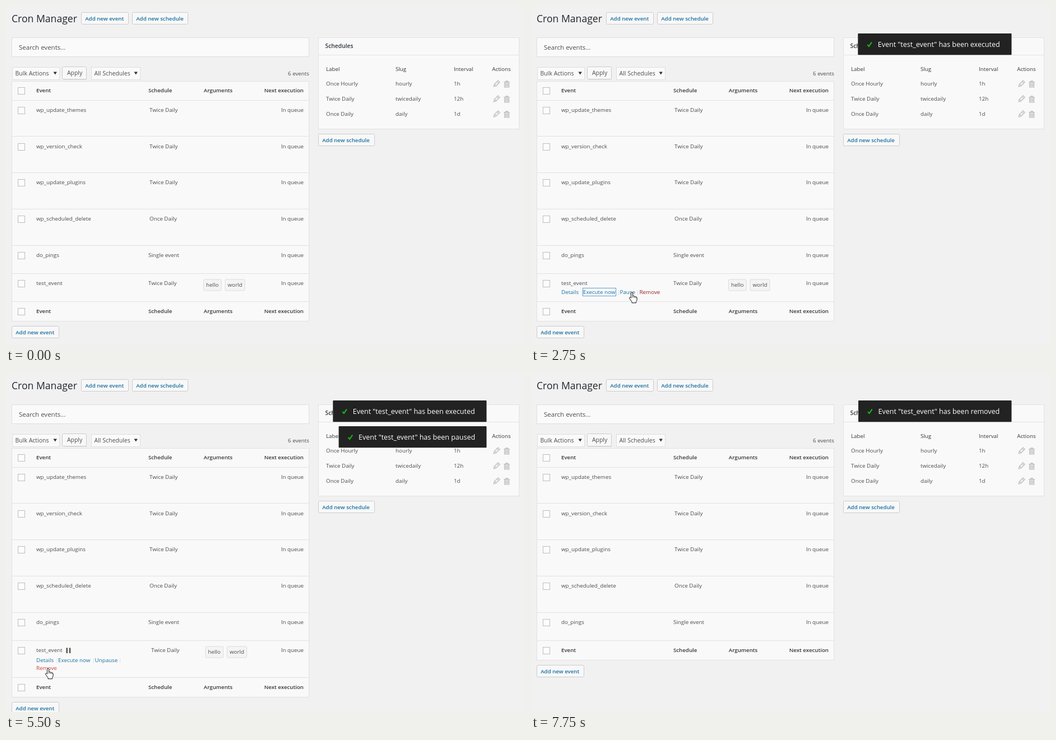
Recreate the animation shown at these times as an HTML page. Size 926 px wide and 605 px high, loop 8.25 s.

```html
<!DOCTYPE html>
<html lang="en">
<head>
<meta charset="utf-8">
<title>Cron Manager</title>
<style>
html, body { margin: 0; width: 100%; height: 100%; overflow: hidden; background: #f1f1f1; }
svg { display: block; width: 926px; height: 605px; }
text { font-family: "Open Sans", "Noto Sans", sans-serif; font-size: 9.8px; fill: #4c4c4c; white-space: pre; }
.title { fill: #23282d; }
.b { font-weight: 600; font-size: 9.7px; fill: #32373c; }
.m { font-weight: 500; fill: #32373c; }
.btn { font-weight: 600; font-size: 9.7px; fill: #1a6f9f; }
.link { fill: #1a72a3; }
.del { fill: #96201e; }
.sep { fill: #d5d5d5; }
.toast { fill: #fff; }
</style>
</head>
<body>
<svg id="stage" viewBox="0 0 926 605"></svg>
<script>
const STEP = 250, LOOP = 8250;
const LINE = '#e2e2e2', PANEL = '#f9f9f9';

// y is the middle of the capitals; baselines sit on whole pixels
const text = (x, y, s, cls = '', size = 9.8, extra = '') =>
  `<text x="${x}" y="${Math.round(y + size * 0.33)}" class="${cls}" ${size !== 9.8 ? `style="font-size:${size}px"` : ''} ${extra}>${s}</text>`;
const right = (x, y, s, cls) => text(x, y, s, cls, 9.8, 'text-anchor="end"');
const box = (x, y, w, h, fill, stroke, r = 0, extra = '') =>
  `<rect x="${x + 0.5}" y="${y + 0.5}" width="${w}" height="${h}" rx="${r}" fill="${fill}" stroke="${stroke}" ${extra}/>`;
const hline = (x1, x2, y) => `<path d="M${x1} ${y}H${x2}" stroke="${LINE}"/>`;
const group = (id, body) => `<g id="${id}">${body}</g>`;

const button = (x, y, w, s) => box(x, y, w, 21, '#f8f8f8', '#ccc', 2) + text(x + 7.2, y + 11.7, s, 'btn');
const checkbox = y => box(21, Math.round(y) - 6, 12, 12, '#fdfdfd', '#b9bdc1');
const select = (x, w, s) => box(x, 109, w, 22, '#fafafa', '#dedede') + text(x + 5.5, 120.5, s, '', 10.5) +
  `<path d="M${x + w - 10.5} 117.5h6.4l-3.2 5z" fill="#333"/>`;
const heading = y => checkbox(y) + text(54, y, 'Event', 'b') + text(254, y, 'Schedule', 'b') +
  text(352.8, y, 'Arguments', 'b') + right(531, y, 'Next execution', 'b');
const eventRow = (name, plan, x, y) => checkbox(y) + text(54, y, name) + text(x, y, plan) + right(531, y, 'In queue');
const tag = (x, w, s) => box(x, 487.5, w, 20, '#f4f4f4', '#dcdcdc', 2) + text(x + 5, 498, s);
const pencil = y => `<g transform="translate(875 ${y}) rotate(45)" fill="#eee" stroke="#bdbdbd" stroke-width="1.1">
  <path d="M-2.3 -6.5h4.6v9.5l-2.3 4l-2.3 -4z M-2.3 -4h4.6 M-2.3 3h4.6"/></g>`;
const trash = y => `<g transform="translate(893.5 ${y})" fill="#e4e4e4" stroke="#bdbdbd" stroke-width="1.2">
  <path d="M-5.2 -3.8h10.4 M-1.8 -4v-1.7h3.6v1.7 M-4 -3.5v9h8v-9 M-1.5 -2v6 M1.5 -2v6"/></g>`;
const schedule = (label, slug, every, y) => text(571, y, label) + text(695, y, slug) + text(799, y, every) + pencil(y) + trash(y + 0.5);
const focus = (id, x, y, w, h) => box(x, y, w, h, 'none', '#5b9dd9', 0, `id="${id}"`);
const toast = (id, x, what) => group(id,
  `<rect x="${x}" width="${857.4 - x}" height="38.3" rx="1" fill="#222"/>
   <path d="M${x + 17} 20l2.6 3l5 -7.4" fill="none" stroke="#13b613" stroke-width="2.2"/>` +
  text(x + 35.5, 19.8, `Event "test_event" has been ${what}`, 'toast', 12.5));

const page =
  text(10, 23, 'Cron Manager', 'title', 17.6) +
  button(134, 11, 84, 'Add new event') + button(225, 11, 99, 'Add new schedule') +
  box(10, 56, 530, 34, '#fafafa', '#dedede') + text(23, 74, 'Search events...', '', 11.5) +
  select(11, 84, 'Bulk Actions') + select(152, 87, 'All Schedules') +
  '<path d="M102 131h42" stroke="#d2d2d2"/>' +
  box(100, 108, 43, 22, '#f8f8f8', '#ccc', 2) + text(109, 119.5, 'Apply', '', 10.4) +
  right(541, 120.5, '6 events') +
  box(557, 56, 358, 163, PANEL, LINE) + hline(557, 916, 87.5) + text(569.5, 72, 'Schedules', 'b', 10.3) +
  text(571, 113, 'Label', 'm') + text(695, 113, 'Slug', 'm') + text(799, 113, 'Interval', 'm') + text(867.3, 113, 'Actions', 'm') +
  schedule('Once Hourly', 'hourly', '1h', 139) +
  schedule('Twice Daily', 'twicedaily', '12h', 166) +
  schedule('Once Daily', 'daily', '1d', 193) +
  button(557, 228, 100, 'Add new schedule');

const table =
  box(10, 134, 530, 428, PANEL, LINE, 0, 'id="frame"') + heading(151) +
  [168.5, 232.5, 297.5, 362.5, 427.5, 477.5].map(y => hline(11, 540, y)).join('') +
  eventRow('wp_update_themes', 'Twice Daily', 256, 186) +
  eventRow('wp_version_check', 'Twice Daily', 256, 250.5) +
  eventRow('wp_update_plugins', 'Twice Daily', 256, 315) +
  eventRow('wp_scheduled_delete', 'Once Daily', 256, 380) +
  eventRow('do_pings', 'Single event', 254, 444.5);

const links = (id, y, pause, sepX) => group(id,
  text(54, y, 'Details', 'link') + text(93, y, 'Execute now', 'link') + text(158.5, y, pause, 'link') +
  [88.5, 154, sepX].map(x => text(x, y, '|', 'sep')).join(''));

const testRow = group('row',
  checkbox(495) + text(54, 495, 'test_event') + right(531, 495, 'In queue') +
  group('plan', text(254, 495, 'Twice Daily')) +
  group('tags', tag(352, 31.5, 'hello') + tag(390.5, 35, 'world')) +
  group('bars', '<path d="M108.7 490.5v9.5M114 490.5v9.5" stroke="#5c564e" stroke-width="2.6"/>') +
  links('linksA', 511, 'Pause', 188) + links('linksB', 512.7, 'Unpause', 201) +
  group('remove', text(0, 0, 'Remove', 'del')) +
  focus('focusRun', 92, 503, 59, 14) + focus('focusPause', 158, 503, 28, 14) + focus('focusRemove', 53, 519, 38, 14));

const foot = group('foot', hline(11, 540, 527.5) + heading(545) + button(10, 571, 84, 'Add new event'));

const toasts = toast('toast0', 583.3, 'executed') + toast('toast1', 593.6, 'paused') + toast('toast2', 584, 'removed');

const cursors = group('arrow',
  '<path d="M0 0v13l3 -2.8l2 4.8l2.3 -1l-2 -4.6h4z" fill="#fff" stroke="#111" stroke-linejoin="round"/>') +
  group('hand', `<path d="M-1.5 1.5q0 -1.5 1.5 -1.5t1.5 1.5v5q2.5 -1 2.8 .8q2.4 -.8 2.6 .9q2.2 -.4 2.2 1.6
    v3.2q0 2 -1.6 3.5v2.3h-7.5v-2q-2 -2.6 -4.4 -6q-.8 -1.8 .8 -2q1.2 0 2.1 1.4z" fill="#fff" stroke="#111" stroke-linejoin="round"/>
    <path d="M1.5 6.5v3M4.3 7.5v2.5M6.9 8.5v2" stroke="#111" stroke-width=".8"/>`);

document.getElementById('stage').innerHTML =
  '<rect width="926" height="605" fill="#f1f1f1"/>' + page + table + foot + testRow + toasts + cursors;

const el = id => document.getElementById(id);
const show = (id, on) => el(id).setAttribute('display', on ? 'inline' : 'none');
const move = (id, x, y) => el(id).setAttribute('transform', `translate(${x} ${y})`);

// [step, x, y] of the pointer tip
const trail = [[1, 268, 522], [5, 138, 517], [8, 138, 517], [11, 180, 511], [18, 180, 511],
  [19, 167.5, 559], [22, 75, 527], [25, 75, 527]];
function pointer(n) {
  const i = Math.max(1, trail.findIndex(k => k[0] >= n));
  const [a, x, y] = trail[i - 1], [b, u, v] = trail[i];
  const p = (n - a) / (b - a);
  return [x + (u - x) * p, y + (v - y) * p];
}

const born = [7, 14, 25], LIFE = 16;
function placeToast(i, n) {
  const age = n - born[i], prevEnd = i ? born[i - 1] + LIFE : -1;
  let y = n <= prevEnd ? 95 : 49, alpha = 1;
  if (age === 0) { y += 5.4; alpha = 0.8; }
  if (age === LIFE) { y -= 14; alpha = 0.4; }
  if (i === 1 && n === prevEnd + 1) y += 6.2;
  show('toast' + i, age >= 0 && age <= LIFE);
  move('toast' + i, 0, y);
  el('toast' + i).setAttribute('opacity', alpha);
}

function draw(ms) {
  const n = Math.floor((ms % LOOP) / STEP);
  const paused = n >= 14, removed = n >= 25;
  const hover = n >= 1 && n !== 19 && n !== 20 && !removed;
  const grow = removed ? -50 : paused ? 16 : 0;

  el('frame').setAttribute('height', 428 + grow);
  move('foot', 0, grow);
  show('row', !removed);
  move('plan', paused ? 5 : 0, 0);
  move('tags', paused ? 3.5 : 0, 0);
  show('bars', paused);
  show('linksA', hover && !paused);
  show('linksB', hover && paused);
  show('remove', hover);
  if (paused) move('remove', 54, 527); else move('remove', 193.5, 511);
  el('remove').firstChild.style.fill = n >= 22 ? '#d0403c' : '';
  show('focusRun', n >= 6 && n < 13);
  show('focusPause', n === 13);
  show('focusRemove', n === 24);
  born.forEach((_, i) => placeToast(i, n));

  const visible = n >= 1 && n <= 25;
  const hand = (n >= 3 && n <= 18) || n >= 21;
  show('arrow', visible && !hand);
  show('hand', visible && hand);
  if (visible) move(hand ? 'hand' : 'arrow', ...pointer(n));
}

const start = performance.now();
(function tick() {
  draw(performance.now() - start);
  requestAnimationFrame(tick);
})();
</script>
</body>
</html>
```
